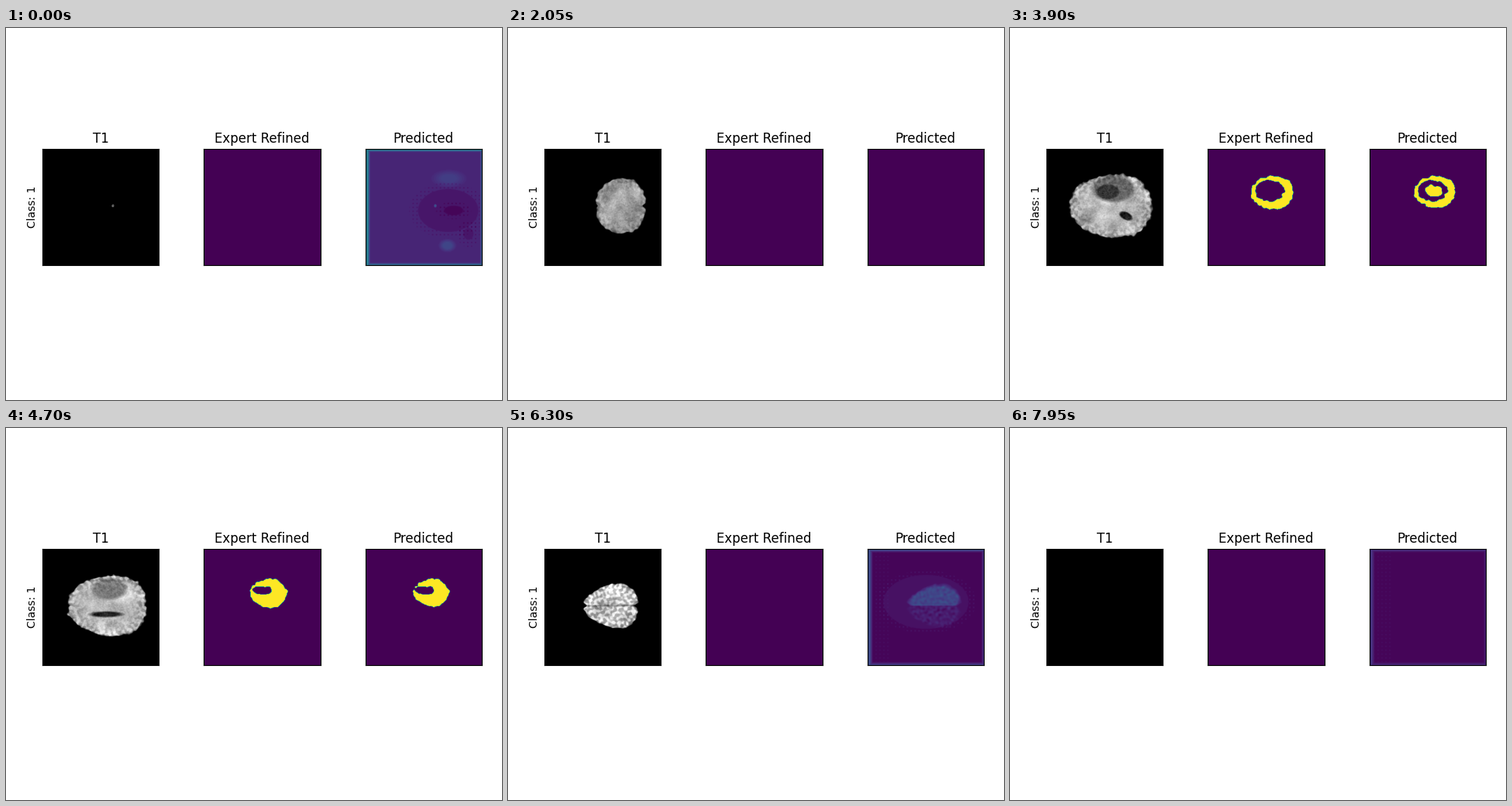
These frames come from a looping animation (640 px wide and 480 px high, 8 s). A matplotlib script:

```python
import numpy as np
import matplotlib.pyplot as plt
from matplotlib.animation import FuncAnimation

W, H, DPI = 640, 480, 100
N, FRAMES, STEP = 240, 160, 4
LEFT, TOP, SIZE, PITCH = 47.0, 156.1, 150.2, 208.4   # panel layout in pixels
MID = 74                                             # midline of the head

grid = (np.arange(N) + 0.5) * SIZE / N
X, Y = np.meshgrid(grid, grid)
cell = (np.arange(N) % 8 < 3).astype(float)
DOTS = np.outer(cell, cell)


def ell(cx, cy, rx, ry, tilt=0.0):
    """Rough signed distance to an ellipse, positive inside."""
    dx = X - cx
    return min(rx, ry) * (1 - np.hypot(dx / rx, (Y - cy - tilt * dx) / ry))


def soft(d, width=1.0):
    return np.clip(d / width, 0, 1)


def dotted(d, reach=6):
    return soft(d + reach * (DOTS - 0.5))


def ramp(t, start, end):
    return float(np.clip((t - start) / (end - start), 0, 1))


def arch(t, start, end):
    """Rises from 0 to 1 and falls back along half a sine wave."""
    return np.sin(np.pi * ramp(t, start, end))


def lerp(a, b, f):
    return a + (b - a) * f


def make_noise(seed, size, band):
    rng = np.random.default_rng(seed)
    k = np.hypot(np.fft.fftfreq(N)[:, None], np.fft.rfftfreq(N)[None, :])
    spec = np.fft.rfft2(rng.standard_normal((FRAMES // STEP, N, N)))
    out = np.fft.irfft2(spec * k ** band * np.exp(-(k * size) ** 2), s=(N, N))
    return out / out.std()


def at(noise, t):
    i, f = t // STEP, t % STEP / STEP
    mix = lerp(noise[i], noise[(i + 1) % len(noise)], f)
    return mix / np.hypot(f, 1 - f)


GYRI = make_noise(1, 13, 2)
FINE = make_noise(2, 5, 1)
BLOB = make_noise(3, 13, 0)
COARSE = make_noise(4, 30, 0)


def outline(t):
    """Level of the brain section: 0 on the rim, 1 in the middle."""
    grow = np.sqrt(arch(t, -0.1, 148))
    if grow < 0.01:
        return np.full((N, N), -1.0)
    rise = ramp(t, 20, 70)
    left, right = 90 - 0.8 - 60 * grow * rise - 4 * grow * (1 - rise), 90 + 46 * grow
    u = (2 * X - left - right) / (right - left)
    egg = rise * (0.1 + 0.2 * ((t - 75) / 50) ** 2)
    v = (Y - MID) / (41 * grow) / (1 + egg * np.clip(u, -1, 1))
    level = 1 - np.abs(u) ** 2.2 - np.abs(v) ** 2.2
    if t > 3:
        notch = 0.35 * abs(np.cos(np.pi * t / 150))
        level -= notch * np.exp(-((Y - MID) / 2.2) ** 2) * np.clip(u * u, 0, 1)
        level += 0.035 * at(BLOB, t)
    return level


# Inner anatomy: (peak, half span, darkening, ellipse)
SPOTS = [(peak, span, dark, soft(ell(*shape), 1.8)) for peak, span, dark, shape in [
    (25, 17, 0.35, (98, MID, 7, 9)),             # fourth ventricle
    (25, 12, -0.6, (90, MID, 5, 5.5)),           # brain stem
    (57, 22, 1.0, (56, 75, 18, 9)),              # gap between the lobes
    (57, 18, 0.25, (96, 78, 18, 11)),            # midbrain cisterns
    (57, 18, -0.35, (86, 79, 9, 7)),
    (78, 18, 0.2, (79, 56, 16, 10)),             # tumour core
    (78, 16, 0.6, (102, 87, 9.5, 6, 0.3)),       # lateral ventricles
    (94, 16, 0.6, (82, 85, 25, 4.5)),
]]


def brain(t, level):
    late = ramp(t, 98, 120)
    inner = np.clip(level, 0, 1)
    folds = np.tanh(1.6 * at(GYRI, t)) * np.exp(-inner * lerp(2.6, 0.5, late))
    img = min(0.5 + 0.0026 * t, 0.8) + (0.1 + 0.001 * t) * folds
    img += 0.06 * at(COARSE, t) + 0.025 * at(FINE, t) - 0.2 * np.exp(-inner * 9)
    img -= 0.3 * late * np.exp(-((Y - MID) / 1.3) ** 2)

    size = np.sqrt(arch(t, 38, 112))
    if size > 0.1:
        tumour = soft(ell(86, 52, 30 * size, 19 * size), 4)
        img -= tumour * (0.3 * size + 0.07 * at(COARSE, t))

    img *= soft(level, 0.08)
    for peak, span, dark, area in SPOTS:
        img -= max(0, 1 - abs(t - peak) / span) * dark * area
    return np.clip(img, 0, 1)


# Lesion rim at three moments: outer ellipse, then the hole inside it
POSE_KEYS = [57, 78, 94]
POSES = np.array([
    [86, 49, 25, 14.5, 76, 47, 17, 14],
    [83, 57, 27.5, 21.5, 80, 55, 18.5, 13.5],
    [84, 58, 23.5, 18.5, 75, 55, 15, 5],
])


def segment(t, patches, cutoff, shift=0, core=0):
    """Binary lesion mask; patches is the noise that fills the early hole."""
    if not 36 < t < 112:
        return np.zeros((N, N))
    ox, oy, orx, ory, hx, hy, hrx, hry = [np.interp(t, POSE_KEYS, c) for c in POSES.T]
    outer = ell(ox + shift, oy - shift, orx - shift, ory - shift)
    score = np.minimum(outer, -ell(hx + shift, hy, hrx, hry))
    score += 0.8 * at(BLOB, t)
    if core:
        filled = ell(hx + 2, hy, 0.62 * hrx, 0.58 * hry) - 8 * abs(t - 78) / 12
        score = np.maximum(score, filled + 0.6 * at(BLOB, t))
    fade = abs(t - 57) / 10
    specks = 3 * (at(patches, t) - cutoff - fade) - 0.1 * outer
    score = np.maximum(score, np.minimum(outer, specks))
    score -= 14 * max(0, abs(t - 75) - 20) / 18
    return (score > 0).astype(float)


# Faint response of the network on empty slices
EDGE = np.maximum.reduce([
    soft(7 - X, 4) * 0.9, soft(6 - Y, 4),
    soft(X - SIZE + 4.5, 4) * 0.75, soft(Y - SIZE + 4.5, 4) * 0.75])


def framed(field, strength):
    return np.maximum(np.round(np.maximum(field, 0) / 0.015) * 0.015, EDGE * strength)


def early_haze(f):
    field = 0.105 - lerp(0.05, 0.1, f) * dotted(ell(106, 80, lerp(45, 30, f), lerp(32, 19, f)), 8)
    field -= lerp(0.04, 0.08, f) * dotted(ell(132, 110, 11, 13), 8)
    field -= 0.045 * (1 - f) * dotted(ell(113, 80, 18, 9), 5)
    field -= 0.03 * f * dotted(np.minimum(X - 68, Y - 108))
    field += lerp(0.07, 0.2, f) * soft(ell(107, 39, 24, 12), 7)
    field += lerp(0.1, 0.06, f) * soft(ell(105, 125, 12, 9), 5)
    field += 0.25 * f * soft(np.minimum(ell(104, 52, 14, 9), 56 - Y), 4)
    field += 0.2 * (1 - f) * soft(ell(89.5, MID, 2, 2.5))
    return framed(field, lerp(0.47, 0.32, f))


def late_haze(t, level):
    f = ramp(t, 136, 155)
    halo = 0.035 * (1 - f) * dotted(ell(75, 69, 60, 38))
    field = framed(0.015 + halo + 0.015 * DOTS * (X < 30), lerp(0.25, 0.16, f))
    glow = np.where(Y < MID, 0.16, 0.03) + 0.02 * at(GYRI, t)
    return field + (1 - ramp(t, 136, 148)) * glow * soft(level, 0.3)


def haze(t, level):
    if t < 34:
        return early_haze(ramp(t, 0, 25)) * (1 - ramp(t, 25, 34))
    if t > 106:
        return late_haze(t, level) * ramp(t, 106, 115)
    return np.zeros((N, N))


fig = plt.figure(figsize=(W / DPI, H / DPI), dpi=DPI, facecolor="white")
images = []
for i, (title, cmap) in enumerate([("T1", "gray"), ("Expert Refined", "viridis"),
                                   ("Predicted", "viridis")]):
    ax = fig.add_axes([(LEFT + i * PITCH) / W, 1 - (TOP + SIZE) / H, SIZE / W, SIZE / H])
    ax.set(xticks=[], yticks=[])
    ax.set_title(title, fontsize=12)
    images.append(ax.imshow(np.zeros((N, N)), cmap=cmap, vmin=0, vmax=1, aspect="auto"))
fig.axes[0].set_ylabel("Class: 1", fontsize=10)


def draw(t):
    level = outline(t)
    images[0].set_data(brain(t, level))
    images[1].set_data(segment(t, FINE, 1.25))
    images[2].set_data(np.maximum(haze(t, level),
                                  segment(t, BLOB, 0.3, shift=1, core=True)))
    return images


anim = FuncAnimation(fig, draw, frames=FRAMES, interval=50, repeat=True,
                     repeat_delay=0, init_func=lambda: draw(0))
plt.show()
```
